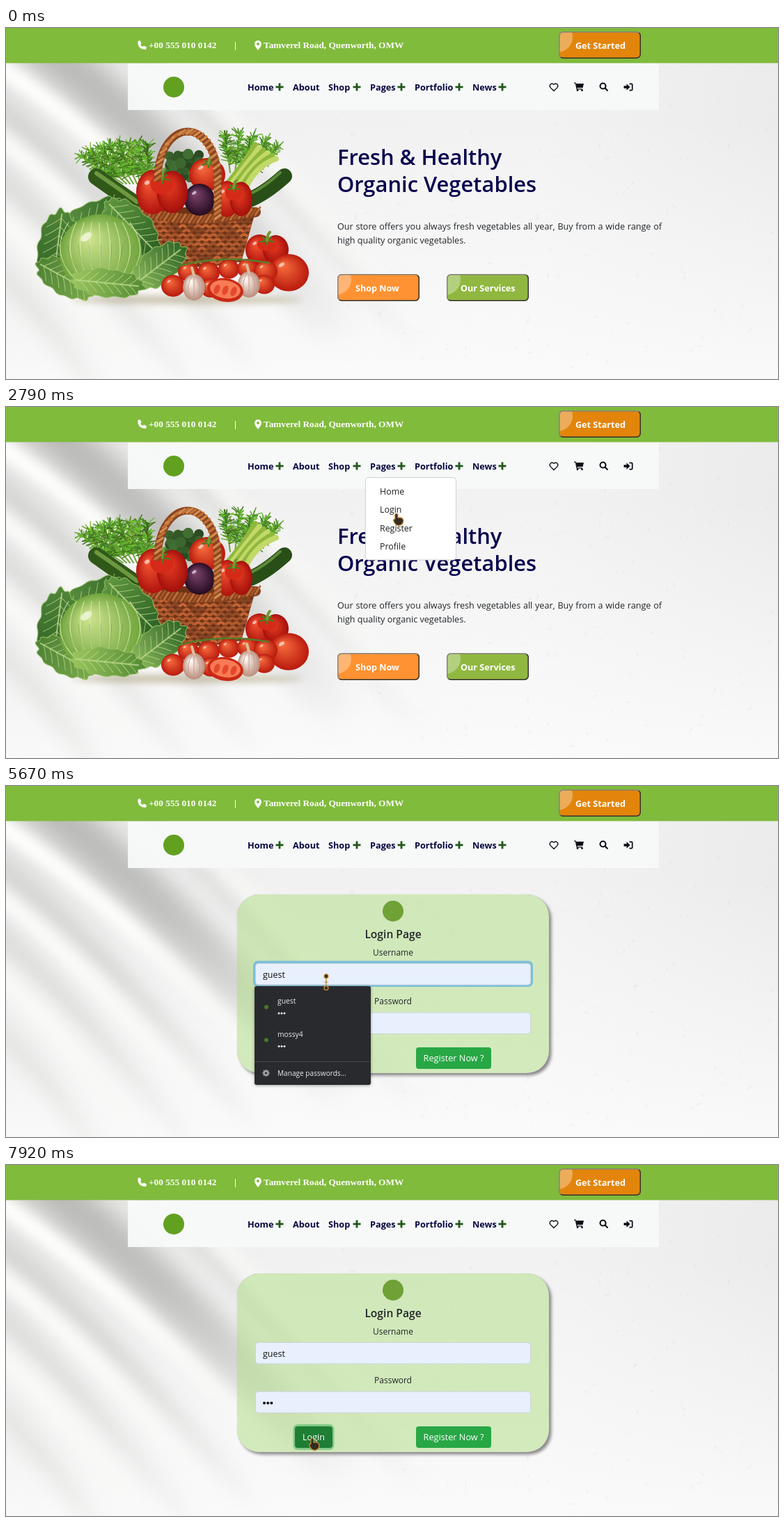
Recreate the animation shown at these times as an HTML page with a canvas. Size 1109 by 505 pixels, loop 8 s.

```html
<!DOCTYPE html>
<html lang="en">
<head>
<meta charset="utf-8">
<title>Organic shop</title>
<style>
html, body { margin: 0; width: 100%; height: 100%; overflow: hidden; background: #f0f0f0; }
canvas { display: block; }
</style>
</head>
<body>
<canvas id="stage" width="1109" height="505"></canvas>
<script>
const W = 1109, H = 505, LOOP = 8000, TAU = Math.PI * 2;
const SANS = '"Open Sans", "Noto Sans", sans-serif';
const SERIF = '"Liberation Serif", "Noto Serif", serif';
const USERS = ['guest', 'mossy4'];
const screenCtx = document.getElementById('stage').getContext('2d');
let g = screenCtx;
let seed = 1;

const rand = (a = 0, b = 1) => {
  seed = (seed * 16807) % 2147483647;
  return a + (b - a) * seed / 2147483647;
};
const clamp01 = v => Math.max(0, Math.min(1, v));

function layer(draw) {
  const canvas = document.createElement('canvas');
  canvas.width = W;
  canvas.height = H;
  g = canvas.getContext('2d');
  draw();
  g = screenCtx;
  return canvas;
}

function text(str, x, y, size, color, weight = 400, align = 'left', family = SANS) {
  g.font = `${weight} ${size}px ${family}`;
  g.textAlign = align;
  g.fillStyle = color;
  g.fillText(str, x, y);
}

function justified(str, x, y, width, size, color) {
  const words = str.split(' ');
  g.font = `400 ${size}px ${SANS}`;
  const widths = words.map(w => g.measureText(w).width);
  const gap = (width - widths.reduce((a, b) => a + b)) / (words.length - 1);
  words.forEach((word, i) => {
    text(word, x, y, size, color);
    x += widths[i] + gap;
  });
}

function box(x, y, w, h, r, fill, stroke, line = 1) {
  g.beginPath();
  g.roundRect(x, y, w, h, r);
  if (fill) { g.fillStyle = fill; g.fill(); }
  if (stroke) { g.strokeStyle = stroke; g.lineWidth = line; g.stroke(); }
}

function oval(x, y, rx, ry, fill, rot = 0) {
  g.beginPath();
  g.ellipse(x, y, rx, ry, rot, 0, TAU);
  g.fillStyle = fill;
  g.fill();
}
const disc = (x, y, r, fill) => oval(x, y, r, r, fill);

function curve(points, width, color, cap = 'round') {
  const [x, y, ...rest] = points;
  g.beginPath();
  g.moveTo(x, y);
  if (rest.length === 2) g.lineTo(...rest);
  else g.quadraticCurveTo(...rest);
  g.lineWidth = width;
  g.lineCap = cap;
  g.strokeStyle = color;
  g.stroke();
}

function icon(d, x, y, fill, stroke, line = 1.3) {
  const path = new Path2D(d);
  g.save();
  g.translate(x, y);
  if (fill) { g.fillStyle = fill; g.fill(path, 'evenodd'); }
  if (stroke) { g.strokeStyle = stroke; g.lineWidth = line; g.lineCap = 'butt'; g.stroke(path); }
  g.restore();
}

/* ---------- backdrop ---------- */
// A soft crease that fades out towards its lower end.
function fold(points, width, grey, blur) {
  const [x0, y0, , , x1, y1] = points;
  const fade = g.createLinearGradient(x0, y0, x1, y1);
  const tone = a => `rgba(${grey},${grey},${grey - 2},${a})`;
  fade.addColorStop(0, tone(1));
  fade.addColorStop(0.4, tone(0.85));
  fade.addColorStop(0.95, tone(0));
  g.filter = `blur(${blur}px)`;
  curve(points, width, fade, 'butt');
  g.filter = 'none';
}

function drawBackdrop() {
  const across = g.createLinearGradient(0, 80, W, 200);
  across.addColorStop(0, '#e6e6e5');
  across.addColorStop(0.35, '#f1f1f1');
  across.addColorStop(0.7, '#f2f2f2');
  across.addColorStop(1, '#ebebeb');
  g.fillStyle = across;
  g.fillRect(0, 0, W, H);
  const down = g.createLinearGradient(0, 130, 0, H);
  down.addColorStop(0, 'rgba(252,252,252,0)');
  down.addColorStop(1, 'rgba(252,252,252,.85)');
  g.fillStyle = down;
  g.fillRect(0, 0, W, H);

  fold([20, 0, 210, 140, 520, 480], 62, 184, 16);
  fold([-50, 30, 150, 150, 470, 500], 26, 255, 8);
  fold([150, -10, 330, 150, 620, 500], 24, 216, 12);
  fold([200, 0, 370, 180, 680, 520], 24, 250, 12);
  fold([-50, 85, 130, 210, 390, 530], 24, 210, 11);
  fold([-50, 130, 110, 240, 350, 540], 24, 252, 9);
  fold([-50, 180, 90, 290, 300, 560], 22, 218, 11);
  fold([-50, 240, 80, 340, 240, 570], 30, 250, 11);
  fold([-50, 320, 60, 400, 170, 590], 26, 226, 12);
  seed = 77;
  for (let i = 0; i < 200; i++) {
    const x = rand(480, W), y = rand(60, 490);
    oval(x, y, rand(0.5, 5), rand(0.4, 1.5), 'rgba(150,150,150,.07)', rand(0, 3));
  }
}

/* ---------- vegetables ---------- */
function ball(x, y, rx, ry, light, dark) {
  g.save();
  g.translate(x, y);
  g.scale(1, ry / rx);
  const shade = g.createRadialGradient(-rx * 0.3, -rx * 0.4, rx * 0.1, 0, 0, rx);
  shade.addColorStop(0, light);
  shade.addColorStop(1, dark);
  disc(0, 0, rx, shade);
  g.restore();
  oval(x - rx * 0.35, y - ry * 0.42, rx * 0.16, ry * 0.09, 'rgba(255,255,255,.6)', -0.6);
}
const tomato = (x, y, r) => ball(x, y, r, r * 0.92, '#f4683b', '#b91a0d');

function stem(x, y, s) {
  for (let i = 0; i < 5; i++) {
    const a = i * TAU / 5 + 0.3;
    curve([x, y, x + Math.cos(a) * s, y + Math.sin(a) * s * 0.6], 2.4, '#4c7d21');
  }
  curve([x, y, x + 1, y - s, x + 4, y - s * 1.2], 4, '#6f9a32');
}

function pepper(x, y, rx, ry) {
  ball(x - rx * 0.35, y, rx * 0.65, ry, '#f05030', '#b0140d');
  ball(x + rx * 0.4, y, rx * 0.6, ry * 0.95, '#ea3f22', '#a30f0b');
  oval(x, y - ry * 0.35, rx * 0.45, ry * 0.45, '#d62a18');
  stem(x, y - ry * 0.6, rx * 0.32);
}

function dill(x, y, angle, length) {
  const dx = Math.cos(angle), dy = Math.sin(angle);
  curve([x, y, x + dx * length, y + dy * length], 2, '#6fa23a');
  for (let i = 0; i < length * 1.8; i++) {
    const k = rand(0.2, 1) * length, a = angle + rand(-1.7, 1.7), s = rand(4, 13);
    const px = x + dx * k, py = y + dy * k;
    const hue = rand(86, 104), lum = rand(24, 50);
    curve([px, py, px + Math.cos(a) * s, py + Math.sin(a) * s], 1.4, `hsl(${hue} 58% ${lum}%)`);
  }
}

function leaf(x, y, rx, ry, rot, light, dark) {
  g.save();
  g.translate(x, y);
  g.rotate(rot);
  g.beginPath();
  for (let i = 0; i <= 90; i++) {
    const a = i / 90 * TAU, k = 1 + 0.05 * Math.sin(a * 13) + 0.03 * Math.sin(a * 7 + x);
    g.lineTo(Math.cos(a) * rx * k, Math.sin(a) * ry * k);
  }
  g.closePath();
  const shade = g.createLinearGradient(-rx, 0, rx, 0);
  shade.addColorStop(0, light);
  shade.addColorStop(1, dark);
  g.fillStyle = shade;
  g.fill();
  g.strokeStyle = 'rgba(150,190,100,.8)';
  g.lineWidth = 1.2;
  g.stroke();
  const vein = 'rgba(190,218,140,.75)';
  curve([-rx * 0.9, 0, rx * 0.85, 0], 2.2, vein);
  for (let i = -3; i <= 3; i++) {
    const px = i * rx * 0.23;
    for (const s of [-1, 1]) {
      curve([px - rx * 0.1, 0, px + rx * 0.05, s * ry * 0.3, px + rx * 0.18, s * ry * 0.7], 1, vein);
    }
  }
  g.restore();
}

function drawCabbage() {
  leaf(120, 280, 58, 26, -0.5, '#6c9e48', '#2f6527');
  leaf(74, 316, 54, 28, 1.7, '#4f8438', '#2e6226');
  leaf(180, 286, 50, 27, 0.8, '#5f963f', '#2c6024');
  leaf(86, 360, 46, 24, 0.5, '#4d8135', '#7bab4c');
  ball(136, 324, 59, 56, '#c9e08a', '#6fa43c');
  for (let i = -4; i <= 4; i++) {
    curve([136 + i * 5, 376, 136 + i * 20, 330, 134 + i * 11, 280], 1.3, 'rgba(228,240,180,.7)');
    curve([136 + i * 12, 346, 136 + i * 15, 330, 136 + i * 16, 312], 1, 'rgba(90,140,45,.4)');
  }
  leaf(220, 342, 45, 25, -0.65, '#8cb85c', '#2e6426');
  leaf(146, 367, 52, 20, 0.1, '#9bc65d', '#548b35');
}

function drawBasket() {
  g.save();
  g.beginPath();
  g.moveTo(188, 258);
  g.lineTo(360, 258);
  g.lineTo(338, 336);
  g.quadraticCurveTo(270, 352, 206, 336);
  g.closePath();
  g.fillStyle = '#6f3417';
  g.fill();
  g.clip();
  for (let row = 0; row < 12; row++) {
    for (let col = 0; col < 17; col++) {
      const x = 184 + col * 11 + (row % 2) * 5.5, y = 272 + row * 6.5;
      curve([x, y + 1, x + 4, y - 3, x + 8, y + 1], 4, `hsl(20 58% ${rand(33, 50)}%)`);
    }
  }
  g.restore();
  curve([190, 263, 274, 286, 359, 265], 14, '#85401d');
  for (let i = 0; i < 30; i++) {
    const k = i / 29, x = 188 + k * 172, y = 263 + 11 * Math.sin(k * Math.PI);
    curve([x - 2, y + 6, x + 5, y - 5], 3, i % 2 ? '#bb6e38' : '#a25529');
  }
}

function drawHandle() {
  const at = k => {
    const a = Math.PI + k * Math.PI;
    return [261 + Math.cos(a) * 43, 216 + Math.sin(a) * 67];
  };
  g.beginPath();
  for (let i = 0; i <= 40; i++) g.lineTo(...at(i / 40));
  g.lineTo(304, 275);
  g.lineWidth = 11;
  g.strokeStyle = '#8d4620';
  g.stroke();
  for (let i = 0; i < 34; i++) {
    const [x, y] = i < 26 ? at(i / 25) : [304, 216 + (i - 25) * 7];
    curve([x - 4, y + 3, x + 4, y - 3], 3.5, i % 2 ? '#d18a4c' : '#bd7139');
  }
}

function drawVegetables() {
  seed = 42;
  g.filter = 'blur(5px)';
  oval(260, 391, 165, 6, 'rgba(150,135,90,.45)');
  g.filter = 'none';
  for (let i = 0; i < 8; i++) dill(168 + i * 5, 224, -2.55 + i * 0.14, 72 - i * 2);
  curve([130, 214, 155, 232, 190, 256], 24, '#305819');
  curve([130, 209, 155, 226, 188, 250], 6, '#6d9840');
  for (let i = 0; i < 38; i++) {
    disc(257 + rand(-24, 24), 199 + rand(-18, 18), rand(4, 8), `hsl(105 38% ${rand(20, 32)}%)`);
  }
  for (let i = 0; i < 5; i++) dill(322 + i * 7, 208, -1.7 + i * 0.24, 56);
  for (let i = 0; i < 6; i++) {
    curve([306 + i * 7, 238, 340 + i * 3, 200, 358 + i * 6, 168 + i * 4], 8, i % 2 ? '#c1d968' : '#91b83d');
  }
  curve([347, 248, 370, 240, 400, 213], 22, '#294f18');
  curve([350, 239, 370, 230, 394, 208], 4, '#5d8938');
  tomato(289, 211, 26);
  stem(291, 195, 9);
  drawBasket();
  ball(278, 247, 22, 23, '#794169', '#260c21');
  pepper(224, 236, 37, 32);
  pepper(327, 246, 27, 26);
  drawHandle();
  drawCabbage();
  pepper(375, 319, 31, 22);
  tomato(406, 352, 29);
  for (const [x, y, r] of [[240, 371, 17], [262, 351, 15], [291, 352, 16], [320, 347, 15],
    [347, 346, 15], [373, 350, 17], [371, 369, 15], [294, 374, 15]]) tomato(x, y, r);
  curve([250, 342, 310, 326, 378, 338], 2.5, '#567e2c');
  for (const [x, y] of [[270, 373], [349, 369]]) {
    ball(x, y, 16, 19, '#fff7ef', '#b88d7c');
    for (let i = -1; i <= 1; i++) curve([x, y - 20, x + i * 15, y, x + i * 4, y + 17], 1, '#c79a91');
    curve([x, y - 17, x - 3, y - 28], 4, '#d8bd9d');
  }
  oval(315, 377, 26, 17, '#c92814', 0.15);
  oval(315, 376, 22, 13, '#f77b55', 0.15);
  for (let i = 0; i < 3; i++) oval(303 + i * 12, 376 + i * 1.5, 4, 7, '#e5482b', 0.4);
}

/* ---------- page parts ---------- */
function fancyButton(x, y, label, labelX, fill) {
  box(x, y, 118, 39, 6, fill);
  g.save();
  g.clip();
  disc(x - 2, y + 8, 22, 'rgba(255,255,255,.32)');
  g.restore();
  // Outset border: light on the top and left, dark on the bottom and right.
  const edge = g.createLinearGradient(x + 53, y + 0.5, x + 65, y + 38.5);
  edge.addColorStop(0.48, '#85817a');
  edge.addColorStop(0.52, '#35332d');
  box(x + 0.75, y + 0.75, 116.5, 37.5, 5.5, null, edge, 1.5);
  text(label, labelX, y + 25, 12.6, '#fff', 700);
}

function drawHeader() {
  g.fillStyle = '#80bb3c';
  g.fillRect(0, 0, W, 50.5);
  icon('M1 1L4 0L6 4L4.5 5.5Q6 8 8 9L9.5 7.5L13.5 9.5L12.5 13Q0 13 1 1Z', 188.5, 18, '#fff');
  icon('M5 14Q0 8 0 5A5 5 0 0 1 10 5Q10 8 5 14ZM7 5A2 2 0 1 0 3 5A2 2 0 1 0 7 5Z', 357, 18, '#fff');
  text('+00 555 010 0142', 205, 29, 13.3, '#fff', 700, 'left', SERIF);
  text('|', 328, 29, 13.3, '#fff', 700, 'left', SERIF);
  text('Tamverel Road, Quenworth, OMW', 370, 29, 13.3, '#fff', 700, 'left', SERIF);
  fancyButton(794, 5, 'Get Started', 818, '#e3850b');

  g.fillStyle = 'rgba(248,250,250,.95)';
  g.fillRect(175, 51, 763, 67);
  disc(241, 85, 15, '#62a01f');
  const links = { Home: 347, About: 412, Shop: 463, Pages: 523, Portfolio: 587, News: 670 };
  for (const name in links) text(name, links[name], 89.5, 12.7, '#05053f', 700);
  for (const x of [393, 504, 568, 651, 713]) {
    g.fillStyle = '#22571a';
    g.fillRect(x - 5.5, 83.5, 11, 2.8);
    g.fillRect(x - 1.4, 79.4, 2.8, 11);
  }
  const ink = '#0b0b14';
  icon('M6.5 11.5L1.5 6.6C-1 3 3-1 6.5 2.3C10-1 14 3 11.5 6.6Z', 780.5, 79, null, ink);
  icon('M0 0H2.5L3 1.5H14L12.5 7.5H4.5L4.7 8.7H12V10H3.6L1.8 1.3H0Z', 816, 78.5, ink);
  disc(821, 89.7, 1.4, ink);
  disc(827.5, 89.7, 1.4, ink);
  icon('M9 5A4 4 0 1 0 1 5A4 4 0 1 0 9 5M8 8L12 12', 852.5, 78.5, null, ink, 2.1);
  icon('M0 4.2H4V1.2L9 6L4 10.8V7.8H0Z', 887.5, 79, ink);
  icon('M8 1.3H11Q12.2 1.3 12.2 2.5V9.5Q12.2 10.7 11 10.7H8', 887.5, 79, null, ink, 1.7);
}

function drawHome() {
  drawVegetables();
  text('Fresh & Healthy', 476, 197, 30.9, '#06034d', 600);
  text('Organic Vegetables', 476, 236, 30.9, '#06034d', 600);
  justified('Our store offers you always fresh vegetables all year, Buy from a wide range of',
    476, 290, 466, 12.6, '#22262a');
  text('high quality organic vegetables.', 476, 310, 12.6, '#22262a');
  fancyButton(476, 354, 'Shop Now', 502, '#ff9232');
  fancyButton(633, 354, 'Our Services', 653, '#90b840');
}

function drawCard() {
  g.save();
  g.beginPath();
  g.rect(0, 0, W, H);
  g.roundRect(332, 156, 448, 257, 32);
  g.clip('evenodd');
  g.shadowColor = '#8a888c';
  g.shadowBlur = 4;
  g.shadowOffsetX = g.shadowOffsetY = 3.5;
  box(332, 156, 448, 257, 32, '#888');
  g.restore();
  box(332, 156, 448, 257, 32, 'rgba(180,222,138,.54)');
  disc(556, 180, 15, '#70a137');
  text('Login Page', 556, 219, 15.6, '#212529', 600, 'center');
  text('Username', 556, 244, 12, '#212529', 400, 'center');
  text('Password', 556, 314, 12, '#212529', 400, 'center');
  box(589, 376, 108, 31, 4, '#28a745');
  text('Register Now ?', 643, 396, 12.7, '#fff', 400, 'center');
}

function drawMenu(loginActive) {
  box(516.5, 101.5, 130, 118.5, 4, '#fff', '#d0d0d0');
  if (loginActive) {
    g.fillStyle = '#007bff';
    g.fillRect(517, 134.5, 129, 26);
  }
  ['Home', 'Login', 'Register', 'Profile'].forEach((name, i) =>
    text(name, 537, 126 + i * 26.3, 12.4, '#1b1e21'));
}

function dots(x, y, gap, r, color) {
  for (let i = 0; i < 3; i++) disc(x + i * gap, y, r, color);
}

function drawForm(t) {
  const filled = t >= 4200;
  const focus = clamp01((t - 5000) / 150) * (1 - clamp01((t - 6370) / 140));
  if (focus > 0) box(357, 253.5, 398, 33.5, 5, null, `rgba(110,185,222,${focus * 0.85})`, 4);
  for (const y of [255.5, 326]) box(358.5, y, 395, 30.5, 4, filled ? '#e8f0fe' : '#fff', '#ced4da');
  if (filled) {
    text(USERS[0], 369, 276, 12.5, '#111');
    dots(371, 342.5, 5.2, 2, '#111');
  }
  const pressed = t >= 7840, hover = t >= 6830;
  if (pressed) {
    const a = t < 7920 ? 0.3 : 0.55;
    box(414, 374.5, 56, 34, 5, null, `rgba(72,180,97,${a})`, 3);
  }
  box(415, 376, 54, 31, 4, pressed ? '#1e7e34' : hover ? '#218838' : '#28a745');
  text('Login', 442, 396, 12.6, '#fff', 400, 'center');
}

function drawPasswords(t) {
  g.save();
  g.shadowColor = 'rgba(0,0,0,.35)';
  g.shadowBlur = 4;
  g.shadowOffsetY = 1;
  box(357, 288, 167, 142, 3, '#292a2d');
  g.restore();
  if (t > 5790 && t < 6060) {
    g.fillStyle = '#3d3e41';
    g.fillRect(357, 295, 167, 47);
  }
  USERS.forEach((name, i) => {
    const y = 313 + i * 47.5;
    disc(374, y + 5, 3, '#49782a');
    text(name, 390, y, 10.3, '#e8eaed');
    dots(392, y + 14, 4, 1.5, '#e8eaed');
  });
  g.fillStyle = '#46474a';
  g.fillRect(357, 396, 167, 1);
  for (let i = 0; i < 4; i++) {
    const a = i * Math.PI / 4, dx = Math.cos(a) * 5, dy = Math.sin(a) * 5;
    curve([373.5 - dx, 413 - dy, 373.5 + dx, 413 + dy], 2.2, '#9aa0a6', 'butt');
  }
  disc(373.5, 413, 3.8, '#9aa0a6');
  disc(373.5, 413, 1.6, '#292a2d');
  text('Manage passwords...', 390, 417, 10.1, '#e8eaed');
}

/* ---------- pointer ---------- */
const PATH = [
  [140, 1038, 380], [910, 523, 100], [990, 519, 97], [1070, 516, 95], [1300, 516, 95],
  [1530, 542, 94], [1930, 542, 94], [2710, 563, 154], [3170, 568, 200], [3320, 568, 200],
  [3650, 560, 160], [4200, 560, 160], [4590, 466, 272], [4900, 462, 276], [5510, 462, 276],
  [5670, 460, 282], [5850, 450, 306], [6200, 585, 320], [6370, 585, 320], [6447, 553, 318],
  [6520, 505, 331], [6910, 443, 402]
];

function pointerAt(t) {
  const next = PATH.findIndex(p => p[0] > t);
  if (next < 0) return PATH[PATH.length - 1].slice(1);
  const [t0, x0, y0] = PATH[next - 1], [t1, x1, y1] = PATH[next];
  const k = (t - t0) / (t1 - t0);
  return [x0 + (x1 - x0) * k, y0 + (y1 - y0) * k];
}

function drawPointer(t) {
  if (t < 140) return;
  const [x, y] = pointerAt(t);
  const hand = (t > 1400 && t < 4270) || t > 6800;
  const beam = t > 4400 && t < 5760;
  if (hand) {
    icon('M-5-7Q-3-11-1-7V-3Q6-4 7 1Q7 8 0 8.5Q-5 8-7 2Q-8-1-5-1Z', x, y, '#332d25', '#c98a35', 1.4);
    curve([x - 3, y - 7, x - 3, y], 2.4, '#332d25');
  } else if (beam) {
    curve([x, y - 8, x, y + 8], 1.4, '#b98a3a');
    curve([x - 2.5, y, x + 2.5, y], 1, '#b98a3a');
    for (const dy of [-8.5, 8.5]) {
      disc(x, y + dy, 3.6, '#c4913d');
      disc(x, y + dy, 2.3, '#3c2b16');
    }
  } else {
    icon('M0 0L16 4.5L9 8.5L7 17.5Z', x, y, '#463a22', '#b9a57c', 1.5);
  }
}

/* ---------- scenes ---------- */
const backdrop = layer(() => { drawBackdrop(); drawHeader(); });
const home = layer(drawHome);
const card = layer(drawCard);

function render(t) {
  g.drawImage(backdrop, 0, 0);
  if (t < 3900) {
    g.drawImage(home, 0, 0);
    if (t >= 1700) drawMenu(t >= 3820);
  } else {
    g.drawImage(card, 0, 0);
    drawForm(t);
    if (t >= 5050 && t < 6370) drawPasswords(t);
  }
  drawPointer(t);
}

const start = performance.now();
function tick() {
  render((performance.now() - start) % LOOP);
  requestAnimationFrame(tick);
}
tick();
</script>
</body>
</html>
```
